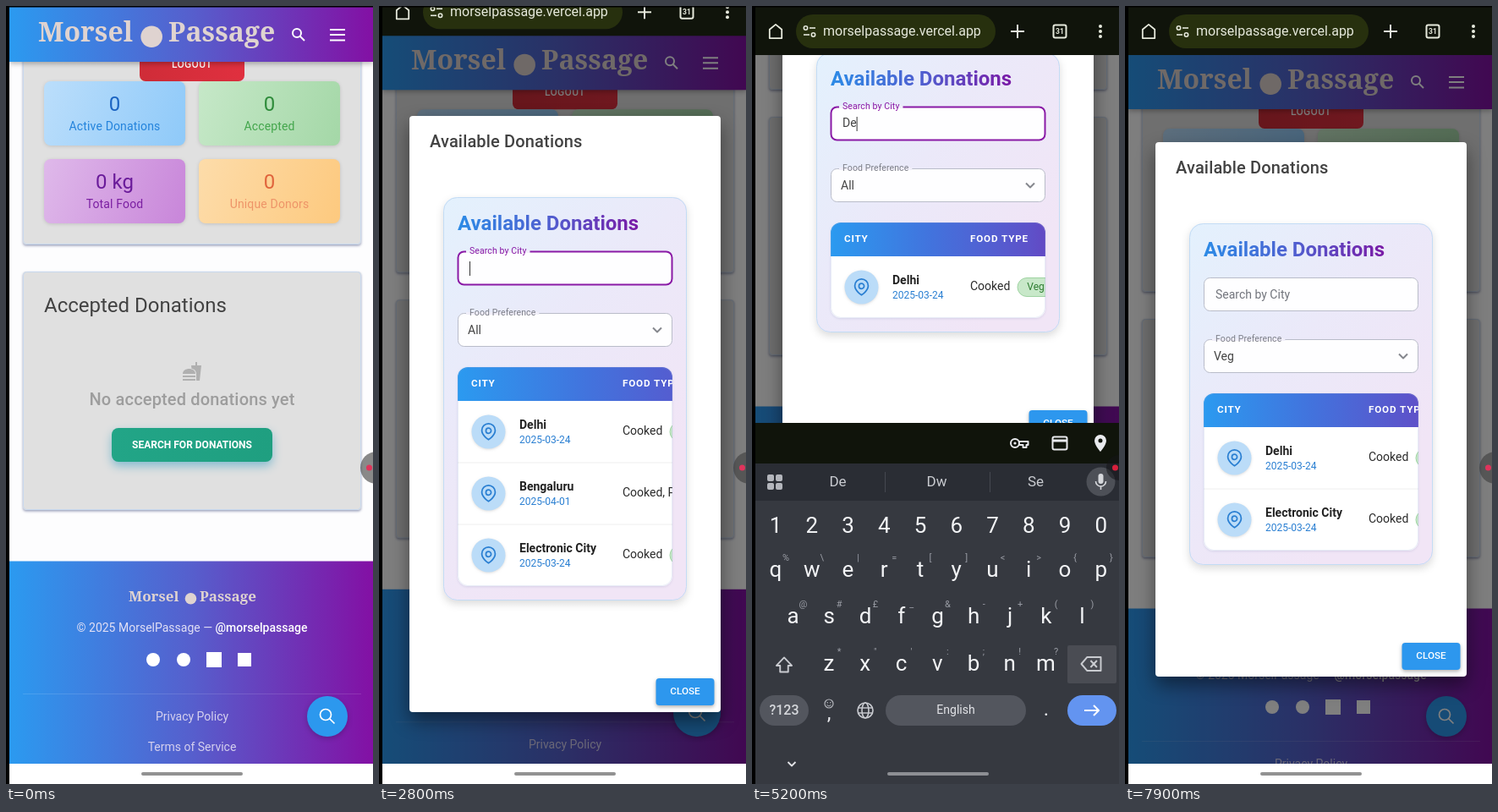
Write an HTML page with a canvas that moves like this. It is 434x920 px and loops after 8 s.

```html
<!DOCTYPE html>
<html lang="en">
<head>
<meta charset="utf-8">
<title>Available Donations</title>
<style>
html, body { margin: 0; width: 100%; height: 100%; overflow: hidden; background: #fff; }
canvas { display: block; width: 434px; height: 920px; }
</style>
</head>
<body>
<canvas id="stage"></canvas>
<script>
const W = 434, H = 920, LOOP = 8000, BAR = 56;
const cv = document.getElementById('stage'), c = cv.getContext('2d');
const dpr = window.devicePixelRatio || 1;
cv.width = W * dpr;
cv.height = H * dpr;

const SANS = 'Roboto, "Open Sans", sans-serif', SERIF = '"Noto Serif", serif';
const BRAND = ['Morsel', 'Passage'];

const clamp = v => Math.max(0, Math.min(1, v));
const lin = (t, a, b) => clamp((t - a) / (b - a));
const ease = (t, a, b) => { const p = lin(t, a, b); return p * p * (3 - 2 * p); };
const fling = (t, a, b) => 1 - Math.pow(1 - lin(t, a, b), 3);

function text(s, x, y, size, color, o = {}) {
  c.font = `${o.w || 400} ${size}px ${o.font || SANS}`;
  c.letterSpacing = (o.ls || 0) + 'px';
  c.textAlign = o.align || 'left';
  c.textBaseline = 'middle';
  c.fillStyle = color;
  c.fillText(s, x, y);
}
const mid = (s, x, y, size, color, o = {}) => text(s, x, y, size, color, { ...o, align: 'center' });

function box(x, y, w, h, r, fill, stroke, lw = 1) {
  c.beginPath();
  c.roundRect(x, y, w, h, r);
  if (fill) { c.fillStyle = fill; c.fill(); }
  if (stroke) { c.strokeStyle = stroke; c.lineWidth = lw; c.stroke(); }
}
function disc(x, y, r, fill, stroke, lw = 2) {
  c.beginPath();
  c.arc(x, y, r, 0, Math.PI * 2);
  if (fill) { c.fillStyle = fill; c.fill(); }
  if (stroke) { c.strokeStyle = stroke; c.lineWidth = lw; c.stroke(); }
}
function shade(color, blur, dy, draw) {
  c.save();
  c.shadowColor = color;
  c.shadowBlur = blur * dpr;
  c.shadowOffsetY = dy * dpr;
  draw();
  c.restore();
}
function grad(x0, y0, x1, y1, ...stops) {
  const g = c.createLinearGradient(x0, y0, x1, y1);
  stops.forEach((s, i) => g.addColorStop(i / (stops.length - 1), s));
  return g;
}
function line(color, lw, ...pts) {
  c.beginPath();
  for (let i = 0; i < pts.length; i += 2) c.lineTo(pts[i], pts[i + 1]);
  c.strokeStyle = color;
  c.lineWidth = lw;
  c.lineJoin = 'round';
  c.stroke();
}
// Icon paths live on a 24-unit grid centred on (x, y)
function icon(d, x, y, scale, color, lw) {
  c.save();
  c.translate(x, y);
  c.scale(scale, scale);
  c.translate(-12, -12);
  const p = new Path2D(d);
  c.lineJoin = 'round';
  if (lw) { c.strokeStyle = color; c.lineWidth = lw; c.stroke(p); }
  else { c.fillStyle = color; c.fill(p, 'evenodd'); }
  c.restore();
}
const ICON = {
  home: 'M12 3L4 9.5V21H20V9.5Z',
  pin: 'M21 10c0 7-9 12.5-9 12.5s-9-5.5-9-12.5a9 9 0 0 1 18 0zM15.5 10.5a3.500 3.500 0 1 0-7 0a3.500 3.500 0 1 0 7 0',
  place: 'M12 2a7 7 0 0 0-7 7c0 5.2 7 13 7 13s7-7.800 7-13a7 7 0 0 0-7-7zM12 6.500a2.500 2.500 0 1 1 0 5a2.500 2.500 0 1 1 0-5',
  shift: 'M12 3L2.500 13H7V21H17V13H21.500Z',
  back: 'M8 5H22V19H8L2 12ZM11.500 8.500L18 15.500M18 8.500L11.500 15.500',
  food: 'M1 21h15v2H1zM1 17h15v2H1zM1 15c0-8 15-8 15 0zM11 5h5V1h2v4h5l-2 18h-4V15c0-4-3-6-5.500-6z'
};
const lens = (x, y, r, color, lw = 2) => {
  disc(x - 2, y - 2, r, null, color, lw);
  line(color, lw, x - 2 + r * .7, y - 2 + r * .7, x + r + 2, y + r + 2);
};
const pageGrad = () => grad(4, 0, 434, 0, '#2b9af0', '#565fcd', '#8310a4');

function logo(x, y, size, gap) {
  const color = '#dfd3d0', o = { w: 600, font: SERIF };
  text(BRAND[0], x, y, size, color, o);
  disc(x + gap - size * .62, y + size * .1, size * .4, color);
  text(BRAND[1], x + gap, y, size, color, o);
}

const TILES = [
  [45, 89, '0', 'Active Donations', '#bbdefb', '#90caf9', '#1a63c2', '#2383dc'],
  [228, 89, '0', 'Accepted', '#c6e8c8', '#a5d8a8', '#2e8b3a', '#43a64c'],
  [45, 181, '0 kg', 'Total Food', '#dfb9ea', '#c987da', '#6a1b9a', '#7b1fa2'],
  [228, 181, '0', 'Unique Donors', '#fddcaa', '#fdca80', '#e0643c', '#ee9468']
];
function card(y, h) {
  shade('rgba(70,80,130,.55)', 3, 1.5, () => box(20, y, 400, h, 4, '#e0e0e0'));
  box(20.5, y + .5, 399, h - 1, 4, null, '#c9d9ee');
}
function drawPage() {
  c.fillStyle = '#fdfdfe';
  c.fillRect(0, 0, W, 960);
  card(20, 262);
  box(158, 40, 124, 49, 7, grad(158, 0, 282, 0, '#cf2c38', '#e0303f'));
  mid('LOGOUT', 220, 69, 12, '#fff', { w: 500, ls: .3 });
  for (const [x, y, n, label, a, b, k1, k2] of TILES) {
    shade('rgba(0,0,0,.14)', 4, 1, () => box(x, y, 167, 76, 8, grad(x, y, x + 167, y + 60, a, b)));
    mid(n, x + 83.5, y + 28, 24, k1);
    mid(label, x + 83.5, y + 54, 14, k2, { ls: .15 });
  }
  card(314, 282);
  text('Accepted Donations', 45, 355, 24, '#424242');
  icon(ICON.food, 220, 432, 1, '#b0b0b0');
  mid('No accepted donations yet', 220, 466, 20, '#9d9d9d', { w: 500, ls: .15 });
  shade('rgba(40,150,190,.5)', 12, 5, () => box(125, 499, 190, 40, 8, grad(125, 0, 315, 0, '#22a587', '#1f9f80')));
  mid('SEARCH FOR DONATIONS', 220, 519, 12, '#fff', { w: 700 });

  c.fillStyle = pageGrad();
  c.fillRect(4, 656.5, 430, 300);
  logo(145, 699, 17, 84);
  const lead = '© 2025 ' + BRAND.join('') + ' — ', user = '@' + BRAND.join('').toLowerCase();
  c.font = `400 14px ${SANS}`;
  c.letterSpacing = '0px';
  const w1 = c.measureText(lead).width;
  c.font = `500 14px ${SANS}`;
  const x0 = 220 - (w1 + c.measureText(user).width) / 2;
  text(lead, x0, 736, 14, '#e2e0f5');
  text(user, x0 + w1, 736, 14, '#fff', { w: 500 });
  disc(174, 773, 8, '#fff');
  disc(210, 773, 8, '#fff');
  box(237, 764, 18, 18, 0, '#fff');
  box(274, 765, 16, 16, 0, '#fff');
  line('rgba(255,255,255,.12)', 1, 20, 813.5, 420, 813.5);
  mid('Privacy Policy', 220, 841, 14, '#d5d0ee');
  mid('Terms of Service', 220, 877, 14, '#d5d0ee');

  shade('rgba(0,0,0,.3)', 6, 2, () => { c.fillStyle = pageGrad(); c.fillRect(4, 0, 430, 66); });
  logo(38, 33, 32, 154);
  lens(346, 34, 5, '#fff');
  for (const y of [28, 34, 40.5]) line('#fff', 2, 383, y, 401, y);
}

function drawFab(t) {
  const p = ease(t, 780, 950) * (1 - ease(t, 5600, 5700));
  const x = 380 - 4 * p, y = 840 - 4 * p;
  shade('rgba(0,0,0,.22)', 6, 2, () => disc(x, y, 24 + 4 * p, '#2c98ee'));
  lens(x, y, 6.5 + p, '#fff', 1.7);
}

const ROWS = [
  ['Delhi', '2025-03-24', 'Cooked', 'Veg', 30],
  ['Bengaluru', '2025-04-01', 'Cooked, Perishable', 'Non-Veg', 20],
  ['Electronic City', '2025-03-24', 'Cooked', 'Veg', 60]
];
function typed(t) {
  if (t < 3200 || t >= 5450) return '';
  return t < 3400 || t >= 5300 ? 'D' : 'De';
}
function rowsAt(t) {
  if (typed(t)) return [ROWS[0]];
  return t < 7650 ? ROWS : [ROWS[0], ROWS[2]];
}

function drawTable(y, rows, sx, bar) {
  const th = 40 + rows.length * 73;
  // Columns are as wide as their longest cell
  const typeX = rows.length === 1 ? 258 : 288;
  const qtyX = typeX + (rows.includes(ROWS[1]) ? 242 : 130), actX = qtyX + 94, end = qtyX + 179;
  shade('rgba(60,80,140,.14)', 3, 1, () => box(93, y, 254, th, 12, '#fff'));
  c.save();
  c.beginPath();
  c.roundRect(93, y, 254, th, 12);
  c.clip();
  c.translate(-sx, 0);
  c.fillStyle = grad(93, 0, end, 0, '#2b9af0', '#4273dd', '#5e51c9', '#7a18a4', '#7f14a2');
  c.fillRect(93, y, end - 93, 40);
  [['CITY', 109], ['FOOD TYPE', typeX], ['QUANTITY', qtyX], ['ACTIONS', actX]]
    .forEach(([s, x]) => text(s, x, y + 20, 11.7, '#fff', { w: 700, ls: .8 }));
  rows.forEach(([city, date, type, diet, kg], i) => {
    const m = y + 76.5 + i * 73;
    shade('rgba(0,0,0,.13)', 3, 1, () => disc(129.5, m, 20, '#bbdcf8'));
    icon(ICON.pin, 129.5, m, .88, '#2a7fd2', 2);
    text(city, 166, m - 8, 14, '#222', { w: 700 });
    text(date, 166, m + 10, 12, '#2a7fd2');
    text(type, typeX, m - 1, 14, '#2b2b2b');
    const veg = diet === 'Veg', cx = veg ? typeX + 56 : 433, cw = veg ? 43 : 66;
    box(cx, m - 11, cw, 22, 11, veg ? '#c8e8c9' : '#f0f9c6', veg ? '#9fd3a2' : null);
    mid(diet, cx + cw / 2, m, 12, veg ? '#2e7d32' : '#ec8a3c');
    disc(qtyX + 8, m, 8, '#c489d5');
    text(kg + ' kg', qtyX + 24, m, 14, '#6a1b9a', { w: 700 });
    shade('rgba(60,150,70,.4)', 4, 2, () =>
      box(actX, m - 12, 70, 24, 8, grad(actX, 0, actX + 70, 0, '#69bf6e', '#45a84b')));
    mid('ACCEPT', actX + 35, m, 11, '#fff', { w: 700, ls: .3 });
    if (i < rows.length - 1) line('#eeeeee', 1, 93, m + 36.5, end, m + 36.5);
  });
  c.restore();
  if (bar > 0) {
    c.save();
    c.globalAlpha = bar;
    box(93 + sx / 362 * 149, y + th - 5, 104, 4, 0, '#b5b8be');
    c.restore();
  }
  box(93.5, y + .5, 253, th - 1, 12, null, 'rgba(150,170,215,.22)');
}

function field(y, label, value, focus, placeholder) {
  box(93.5, y + .5, 253, 39, 7, 'rgba(255,255,255,.96)', focus ? '#8a1aa6' : '#b9bcc9', focus ? 2 : 1);
  if (!placeholder) {
    c.font = `400 10.5px ${SANS}`;
    c.letterSpacing = '0.1px';
    c.fillStyle = '#f1effa';
    c.fillRect(103, y - 1, c.measureText(label).width + 8, 3);
    text(label, 107, y, 10.5, focus ? '#8a1aa6' : '#7d7f88', { ls: .1 });
  }
  text(placeholder ? label : value, placeholder ? 107 : 105, y + 20.5, 14, placeholder ? '#72757c' : '#424242');
}

function drawModal(t, top, rows) {
  const h = 486 + rows.length * 73;
  shade('rgba(0,0,0,.45)', 22, 10, () => box(36, top, 368, h, 4, '#fff'));
  text('Available Donations', 60, top + 31, 20, '#424242', { w: 500, ls: .15 });
  const py = top + 96, ph = h - 228;
  shade('rgba(0,0,0,.14)', 10, 4, () =>
    box(76, py, 288, ph, 16, grad(76, py, 364, py + ph * .6, '#e3f1fd', '#ebe9f9', '#f1e5f6')));
  box(76.5, py + .5, 287, ph - 1, 16, null, '#c3dcf5');
  text('Available Donations', 93, top + 128, 24, grad(93, 0, 307, 0, '#2c8be6', '#4f5fd0', '#7a1aa6'), { w: 700 });

  const focus = t >= 2600 && t < 7030, s = typed(t);
  field(top + 160, 'Search by City', '', focus, !focus && !s);
  if (focus) {
    text(s, 107, top + 180, 14, '#424242');
    if ((t + 250) % 1000 < 600) {
      const cx = 107.5 + (s ? c.measureText(s).width : 0);
      line('#333', 1, cx, top + 172, cx, top + 189);
    }
  }
  const open = ease(t, 7260, 7380) * (1 - ease(t, 7650, 7780));
  field(top + 233, 'Food Preference', t < 7650 ? 'All' : 'Veg', open > .1);
  line('#85878d', 2, 324, top + 250.5, 329, top + 255.5, 334, top + 250.5);

  const sx = 362 * (fling(t, 1250, 1680) - fling(t, 2000, 2450));
  const bar = lin(t, 1220, 1270) * (1 - lin(t, 2480, 2620));
  drawTable(top + 297, rows, sx, bar);

  const by = top + h - 40;
  shade('rgba(0,0,0,.3)', 4, 2, () => box(327.5, by, 69, 32, 4, '#2d97ee'));
  mid('CLOSE', 362, by + 16, 11.7, '#fff', { w: 500 });

  if (open > 0) {
    c.save();
    c.globalAlpha = open;
    const my = top + 273;
    shade('rgba(0,0,0,.35)', 12, 4, () => box(93, my, 254, 124, 6, '#fff'));
    c.fillStyle = '#f0e3f5';
    c.fillRect(93, my + (t < 7600 ? 8 : 44), 254, 36);
    ['All', 'Veg', 'Non-Veg'].forEach((name, i) => text(name, 109, my + 26 + i * 36, 15, '#333'));
    c.restore();
  }
}

function drawUrlBar(u) {
  c.save();
  c.translate(0, u - BAR);
  c.fillStyle = '#10140b';
  c.fillRect(4, -4, 430, 62);
  box(52, 10, 236, 40, 20, '#27300e');
  const k = '#e6e9dc';
  icon(ICON.home, 28, 30, .9, k, 2);
  for (const [y, d] of [[26, 1], [34, -1]]) {
    disc(68 - 4.5 * d, y, 2.2, null, k, 1.6);
    line(k, 1.6, 68, y, 68 + 7 * d, y);
  }
  c.save();
  c.beginPath();
  c.rect(80, 8, 203, 44);
  c.clip();
  text(BRAND.join('').toLowerCase() + '.vercel.app', 84, 30.5, 16, '#e6e9dc');
  c.restore();
  line(k, 2, 306, 30, 322, 30);
  line(k, 2, 314, 22, 314, 38);
  box(356.5, 22.5, 15, 15, 2, null, k, 2);
  mid('31', 364, 30.5, 8.5, k, { w: 700 });
  for (const y of [24, 30, 36]) disc(412, y, 2, k);
  c.restore();
}

const KEYS = [
  ['1234567890', '', 28, 615],
  ['qwertyuiop', '%\\|=[]<>{}', 28, 667],
  ['asdfghjkl', '@#£_&-+()', 48.5, 722],
  ['zxcvbnm', '*"\':;!?', 91, 778]
];
function drawStrip(s) {
  const k = '#b4b6bc', dim = '#5d6067';
  c.fillStyle = '#2a2d34';
  c.fillRect(4, 541, 430, 44);
  for (const x of [18, 28]) for (const y of [554, 564]) box(x, y, 8, 8, 2, k);
  if (s) {
    const words = s === 'D' ? ['D', 'F', 'S'] : ['De', 'Dw', 'Se'];
    words.forEach((w, i) => mid(w, 101.5 + i * 117, 563, 17, '#c9cbd0'));
    for (const x of [157.5, 281.5]) line('#454850', 1, x, 551, x, 575);
  } else {
    line(dim, 2, 95, 571, 84, 571, 84, 555, 100, 555, 100, 566, 95, 571);
    disc(89, 560.5, 1.2, dim);
    disc(95, 560.5, 1.2, dim);
    line(dim, 1.5, 88, 564.5, 92, 566.5, 96, 564.5);
    mid('GIF', 156, 563, 12, dim, { w: 700, ls: 1 });
    box(211, 554, 18, 18, 2, '#a9acb3');
    box(276.5, 555, 15, 17, 2, null, k, 2);
    box(280, 552, 8, 5, 1, k);
    for (const y of [561, 565, 568.5]) line(k, 1.3, 280, y, 288, y);
    disc(348, 563, 5.5, null, k, 4);
    for (let i = 0; i < 8; i++) {
      const cos = Math.cos(i * Math.PI / 4), sin = Math.sin(i * Math.PI / 4);
      line(k, 3.5, 348 + 6 * cos, 563 + 6 * sin, 348 + 9 * cos, 563 + 9 * sin);
    }
  }
  disc(412.5, 562.5, 17, '#4d5057');
  box(409.5, 553, 6, 12, 3, '#d6d8dc');
  c.beginPath();
  c.arc(412.5, 562, 6, 0, Math.PI);
  c.strokeStyle = '#d6d8dc';
  c.lineWidth = 1.6;
  c.stroke();
  line('#d6d8dc', 1.6, 412.5, 568, 412.5, 572);
}
function drawKeyboard(t, dy) {
  c.save();
  c.translate(0, dy);
  const s = typed(t), caps = !s, k = '#e9eaee';
  c.fillStyle = '#10140b';
  c.fillRect(4, 493, 430, 48);
  line(k, 2, 315, 515, 326.5, 515, 326.5, 519, 324.5, 519, 324.5, 522, 320.5, 522, 320.5, 519, 315, 519);
  disc(311, 517, 5, '#10140b', k, 2);
  disc(311, 517, 1.6, k);
  box(355.5, 509.5, 17, 15, 2, null, k, 2);
  line(k, 3, 355, 514, 373, 514);
  icon(ICON.place, 412, 517, 1, k);

  drawStrip(s);
  c.fillStyle = '#363940';
  c.fillRect(4, 585, 430, 335);
  const down = (a, b, x, y, w) => { if (t >= a && t < b) box(x, y, w, 45, 2, '#4a4c53'); };
  down(3130, 3210, 115, 700, 38);
  down(3270, 3400, 94, 645, 38);
  down(5170, 5290, 373, 756, 58);
  down(5360, 5450, 373, 756, 58);
  for (const [keys, hints, x0, y] of KEYS) {
    [...keys].forEach((ch, i) => {
      const x = x0 + i * 42.75;
      mid(caps ? ch.toUpperCase() : ch, x, y, 26, '#f3f4f6');
      if (hints) mid(hints[i], x + 12, y - 14, 11, '#9a9da5');
    });
  }
  icon(ICON.shift, 38, 779, .95, caps ? '#fff' : '#c9cbd0', caps ? 0 : 2);
  icon(ICON.back, 401, 778, 1.15, '#c9cbd0', 1.7);

  box(9, 815, 58, 36, 18, '#53565e');
  mid('?123', 38, 833, 16, '#d6d8dc', { w: 500 });
  disc(91, 825, 5, null, '#b4b6bc', 1.2);
  disc(89.2, 823.7, .8, '#b4b6bc');
  disc(92.8, 823.7, .8, '#b4b6bc');
  line('#b4b6bc', 1, 88.5, 826.5, 91, 828, 93.5, 826.5);
  mid(',', 91, 837, 24, k);
  disc(134, 833, 9, null, '#c9cbd0', 1.6);
  c.beginPath();
  c.ellipse(134, 833, 4, 9, 0, 0, Math.PI * 2);
  c.stroke();
  for (const y of [830, 836]) line('#c9cbd0', 1.4, 125.5, y, 142.5, y);
  box(158, 815, 166, 36, 18, '#53565e');
  mid('English', 241, 833, 14, '#e3e4e8');
  mid('.', 348, 832, 24, k);
  box(373, 815, 58, 36, 18, '#6394f0');
  line('#fff', 2, 393, 833, 410, 833);
  line('#fff', 2, 404, 827, 410, 833, 404, 839);
  line('#e3e4e8', 1.8, 42.5, 894, 47, 898.5, 51.5, 894);
  c.restore();
}

function draw(t) {
  c.setTransform(dpr, 0, 0, dpr, 0, 0);
  const u = BAR * lin(t, 2700, 2870);
  const scroll = 239 * (ease(t, 4100, 4900) - ease(t, 7030, 7180));
  const kb = fling(t, 2890, 3060) - ease(t, 7030, 7190);
  const shown = ease(t, 950, 1170);
  const rows = rowsAt(t);
  // The dialog stays centred in the space left by the address bar
  const centre = u < BAR ? 449 + u : 477;
  const top = Math.round(centre - (486 + rows.length * 73) / 2);

  c.fillStyle = '#fff';
  c.fillRect(0, 0, W, H);
  c.save();
  c.beginPath();
  c.rect(4, 0, 430, 896);
  c.clip();
  c.save();
  c.translate(0, u - scroll);
  drawPage();
  c.restore();
  c.save();
  c.translate(0, -scroll);
  drawFab(t);
  c.restore();
  if (shown > 0) {
    c.fillStyle = `rgba(0,0,0,${.5 * shown})`;
    c.fillRect(0, 0, W, H);
    c.globalAlpha = shown;
    drawModal(t, top - scroll, rows);
    c.globalAlpha = ease(t, 1000, 1200) * (1 - ease(t, 2400, 2550));
    box(187, 822, 153, 29, 4, 'rgba(35,35,38,.93)');
    mid('Search for donations', 263, 836, 14, '#c8c8cc', { ls: .1 });
    c.globalAlpha = 1;
  }
  c.restore();

  if (u > 0) drawUrlBar(u);
  c.fillStyle = '#fff';
  c.fillRect(4, 896, 430, 24);
  if (kb > 0) drawKeyboard(t, 427 * (1 - kb));
  box(160, 906, 120, 4, 2, kb > .9 ? '#8d8f94' : '#929292');

  if (kb > .5) {
    disc(434, 546, 15, 'rgba(20,20,24,.55)');
    disc(429.5, 546, 3.5, '#d8203c');
  } else {
    disc(438, 546, 19, 'rgba(60,60,60,.6)');
    disc(429.5, 546, 3.5, '#e0345c');
  }
  c.fillStyle = '#000';
  c.fillRect(0, 0, 4, H);
  c.fillRect(0, 0, W, 1.5);
}

const start = performance.now();
function tick() {
  draw((performance.now() - start) % LOOP);
  requestAnimationFrame(tick);
}
tick();
</script>
</body>
</html>
```
